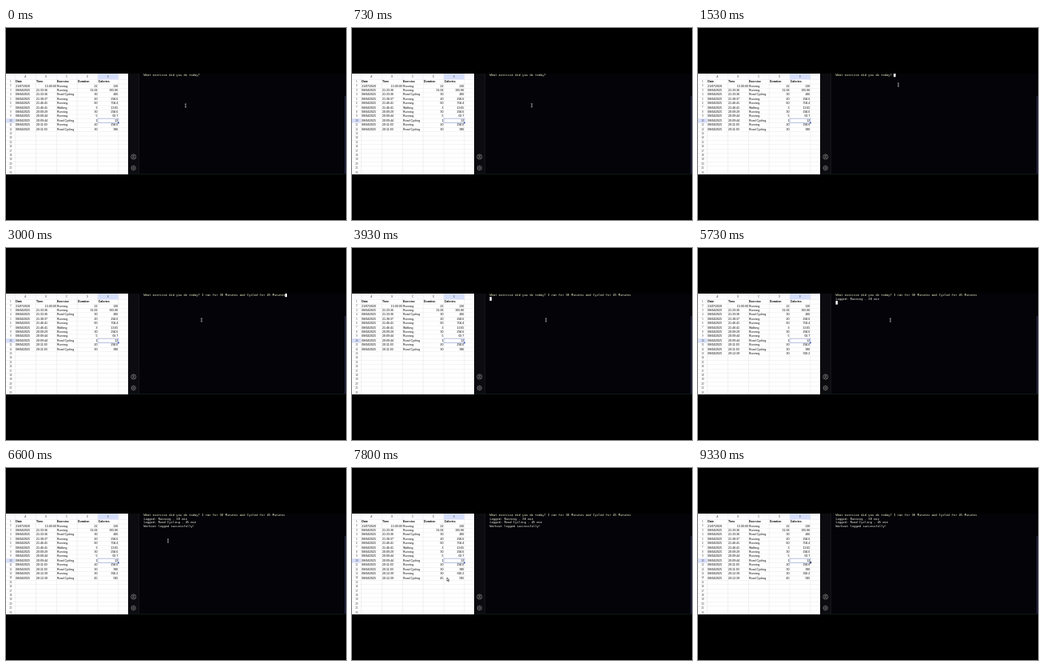
An HTML page with a canvas that plays this animation: 426 px wide and 240 px high, repeating every 9390 ms.

```html
<!DOCTYPE html>
<html lang="en">
<head>
<meta charset="utf-8">
<title>Workout log</title>
<style>
html, body { margin: 0; width: 100%; height: 100%; overflow: hidden; background: #000; }
canvas { display: block; width: 426px; height: 240px; }
</style>
</head>
<body>
<canvas id="stage" width="426" height="240"></canvas>
<script>
const ctx = document.getElementById('stage').getContext('2d');
const LOOP = 9390, STEP = 1000 / 15;
const TOP = 57, BOTTOM = 183;
const SANS = '"Liberation Sans", Arial, sans-serif';
const MONO = '"DejaVu Sans Mono", "Liberation Mono", monospace';

const sheet = { left: 11.4, right: 153, firstRow: 64.4, rowH: 5.41, colW: 25.9 };
const HEAD = ['Date', 'Time', 'Exercise', 'Duration', 'Calories'];
const DAY = '08/04/2025';
const ROWS = [
  ['21/07/2020', '15:00:00', 'Running', '22', '130'],
  [DAY, '21:33:36', 'Running', '31.06', '365.96'],
  [DAY, '21:33:36', 'Road Cycling', '30', '266'],
  [DAY, '21:38:37', 'Running', '20', '294.6'],
  [DAY, '21:46:41', 'Running', '60', '704.4'],
  [DAY, '21:46:41', 'Walking', '3', '13.65'],
  [DAY, '20:09:29', 'Running', '30', '294.6'],
  [DAY, '20:09:44', 'Running', '5', '63.7'],
  [DAY, '20:09:44', 'Road Cycling', '1', '12'],
  [DAY, '20:11:03', 'Running', '20', '294.6'],
  [DAY, '20:11:03', 'Road Cycling', '30', '390'],
  [DAY, '20:12:39', 'Running', '30', '392.2'],
  [DAY, '20:12:39', 'Road Cycling', '45', '595']
];

const PROMPT = 'What exercise did you do today? ';
const ANSWER = 'I ran for 30 Minutes and Cycled for 45 Minutes';
const LOGS = [
  [5500, 'Logged: Running - 30 min'],
  [6130, 'Logged: Road Cycling - 45 min'],
  [6130, 'Workout logged successfully!']
];
const TYPE_START = 1600, TYPE_END = 2930, ENTER = 3470;
const FOCUS = 1000, EXIT = 6130;
const ROW_TIMES = [5430, 6070];
const CHAR_W = 2.27, LINE_H = 4.72, TERM_X = 172.5, TERM_Y = 58.8;

// time, x, y
const MOUSE = [
  [0, 225, 97], [700, 225, 97], [1400, 251, 71], [1800, 251, 71],
  [2600, 245, 90], [3200, 245, 90], [4000, 243, 90], [5600, 243, 90],
  [6600, 203, 91], [7600, 119, 139], [8200, 119, 139], [9100, 141, 118], [LOOP, 141, 118]
];

function rect(x, y, w, h, color) {
  ctx.fillStyle = color;
  ctx.fillRect(x, y, w, h);
}

// Large type scaled down keeps fractional letter advances.
function text(str, x, y, size, color, font = SANS, align = 'left', weight = '') {
  ctx.save();
  ctx.translate(x, y);
  ctx.scale(size / 20, size / 20);
  ctx.font = `${weight} 20px ${font}`;
  ctx.textAlign = align;
  ctx.textBaseline = 'middle';
  ctx.fillStyle = color;
  ctx.fillText(str, 0, 0);
  ctx.restore();
}

function drawSheet(t) {
  const { left, right, firstRow, rowH, colW } = sheet;
  const rowY = n => firstRow + (n - 1) * rowH;
  const colX = n => left + n * colW;
  const mid = rowH / 2 + 0.1;

  rect(0, TOP, right, BOTTOM - TOP, '#fff');
  rect(0, TOP, right, firstRow - TOP, '#fbfbff');
  rect(colX(4), TOP, colW, firstRow - TOP, '#d6dffc');
  rect(0, rowY(10), left, rowH, '#d6dffc');

  for (let n = 1; n <= 22; n++) {
    rect(0, rowY(n), right, 0.5, '#e9e9ec');
    text(n, 5.8, rowY(n) + mid, 3, '#444', SANS, 'center');
  }
  for (let c = 0; c <= 5; c++) {
    rect(colX(c) - 0.25, TOP, 0.5, BOTTOM - TOP, '#e2e2e8');
    if (c < 5) text('ABCDE'[c], colX(c + 0.5), 61, 3, '#555', SANS, 'center');
  }

  HEAD.forEach((label, c) =>
    text(label, colX(c) + 0.8, rowY(1) + mid, 3.55, '#000', SANS, 'left', 'bold'));
  const count = 11 + ROW_TIMES.filter(at => t >= at).length;
  ROWS.slice(0, count).forEach((row, i) => row.forEach((value, c) => {
    const onRight = c > 2 || (i === 0 && c === 1);
    text(value, onRight ? colX(c + 1) - 0.6 : colX(c) + 0.8, rowY(i + 2) + mid,
      3.55, '#000', SANS, onRight ? 'right' : 'left');
  }));

  ctx.strokeStyle = '#7d8ccc';
  ctx.lineWidth = 0.5;
  ctx.strokeRect(colX(4), rowY(10), colW, rowH);
  ctx.fillStyle = '#2a48b0';
  ctx.beginPath();
  ctx.arc(colX(5), rowY(11), 0.9, 0, Math.PI * 2);
  ctx.fill();
}

function ring(x, y, r) {
  ctx.beginPath();
  ctx.arc(x, y, r, 0, Math.PI * 2);
  ctx.stroke();
}

function drawEditorFrame() {
  rect(153, TOP, 14, BOTTOM - TOP, '#0c0c10');
  rect(167, TOP, 259, BOTTOM - TOP, '#030308');
  rect(166.5, TOP, 0.6, BOTTOM - TOP, '#1c1c24');
  rect(424, 85, 2, BOTTOM - 85, '#1c1c34');
  rect(153, BOTTOM - 1, 273, 1, '#0e1a18');
  ctx.strokeStyle = '#858585';
  ctx.lineWidth = 0.7;
  ring(159.8, 161, 3.1);
  ring(159.8, 160.2, 1.1);
  ctx.beginPath();
  ctx.arc(159.8, 164, 2.1, Math.PI * 1.15, Math.PI * 1.85);
  ctx.stroke();
  ring(159.8, 175, 2.5);
  ring(159.8, 175, 0.9);
  for (let i = 0; i < 8; i++) {
    const a = i * Math.PI / 4, dx = Math.cos(a), dy = Math.sin(a);
    ctx.beginPath();
    ctx.moveTo(159.8 + dx * 2.5, 175 + dy * 2.5);
    ctx.lineTo(159.8 + dx * 3.4, 175 + dy * 3.4);
    ctx.stroke();
  }
}

function drawTerminal(t) {
  const line = (str, row, color) =>
    text(str, TERM_X, TERM_Y + row * LINE_H, CHAR_W / 0.602, color, MONO);
  const progress = Math.max(0, Math.min(1, (t - TYPE_START) / (TYPE_END - TYPE_START)));
  const typed = PROMPT + ANSWER.slice(0, Math.round(progress * ANSWER.length));
  line(typed, 0, '#f2f5c8');
  LOGS.forEach(([at, str], i) => { if (t >= at) line(str, i + 1, '#f2f2e4'); });

  if (t >= FOCUS && t < EXIT) {
    const row = t < ENTER ? 0 : 1 + LOGS.filter(([at]) => t >= at).length;
    const x = TERM_X + (t < ENTER ? typed.length * CHAR_W : 0);
    rect(x, TERM_Y - 2.3 + row * LINE_H, 2.5, 4.7, '#fff');
  }
}

function mouseAt(t) {
  const i = Math.max(1, MOUSE.findIndex(key => key[0] > t));
  const [t0, x0, y0] = MOUSE[i - 1], [t1, x1, y1] = MOUSE[i];
  const u = (t - t0) / (t1 - t0), e = u * u * (3 - 2 * u);
  return [x0 + (x1 - x0) * e, y0 + (y1 - y0) * e];
}

function drawMouse(t) {
  const [x, y] = mouseAt(t);
  ctx.save();
  ctx.translate(x, y);
  if (x > 167) {
    rect(-0.35, -2, 0.7, 4, '#ccc');
    rect(-1, -2.3, 2, 0.6, '#ccc');
    rect(-1, 1.7, 2, 0.6, '#ccc');
  } else if (t > 9000) {
    rect(-0.3, -1.7, 0.6, 3.4, '#333');
    rect(-1.7, -0.3, 3.4, 0.6, '#333');
  } else {
    ctx.beginPath();
    [[0, -2], [0, 2.2], [1, 1.4], [1.7, 2.9], [2.4, 2.6], [1.7, 1.1], [2.9, 1]]
      .forEach(p => ctx.lineTo(...p));
    ctx.closePath();
    ctx.fillStyle = '#fff';
    ctx.strokeStyle = '#222';
    ctx.lineWidth = 0.6;
    ctx.fill();
    ctx.stroke();
  }
  ctx.restore();
}

function frame(now) {
  const t = Math.floor((now % LOOP + 4) / STEP) * STEP;
  rect(0, 0, 426, 240, '#000');
  ctx.save();
  ctx.beginPath();
  ctx.rect(0, TOP, 426, BOTTOM - TOP);
  ctx.clip();
  drawSheet(t);
  drawEditorFrame();
  drawTerminal(t);
  drawMouse(Math.min(t, LOOP - 1));
  ctx.restore();
}

const start = performance.now();
function tick() {
  frame(performance.now() - start);
  requestAnimationFrame(tick);
}
tick();
</script>
</body>
</html>
```
